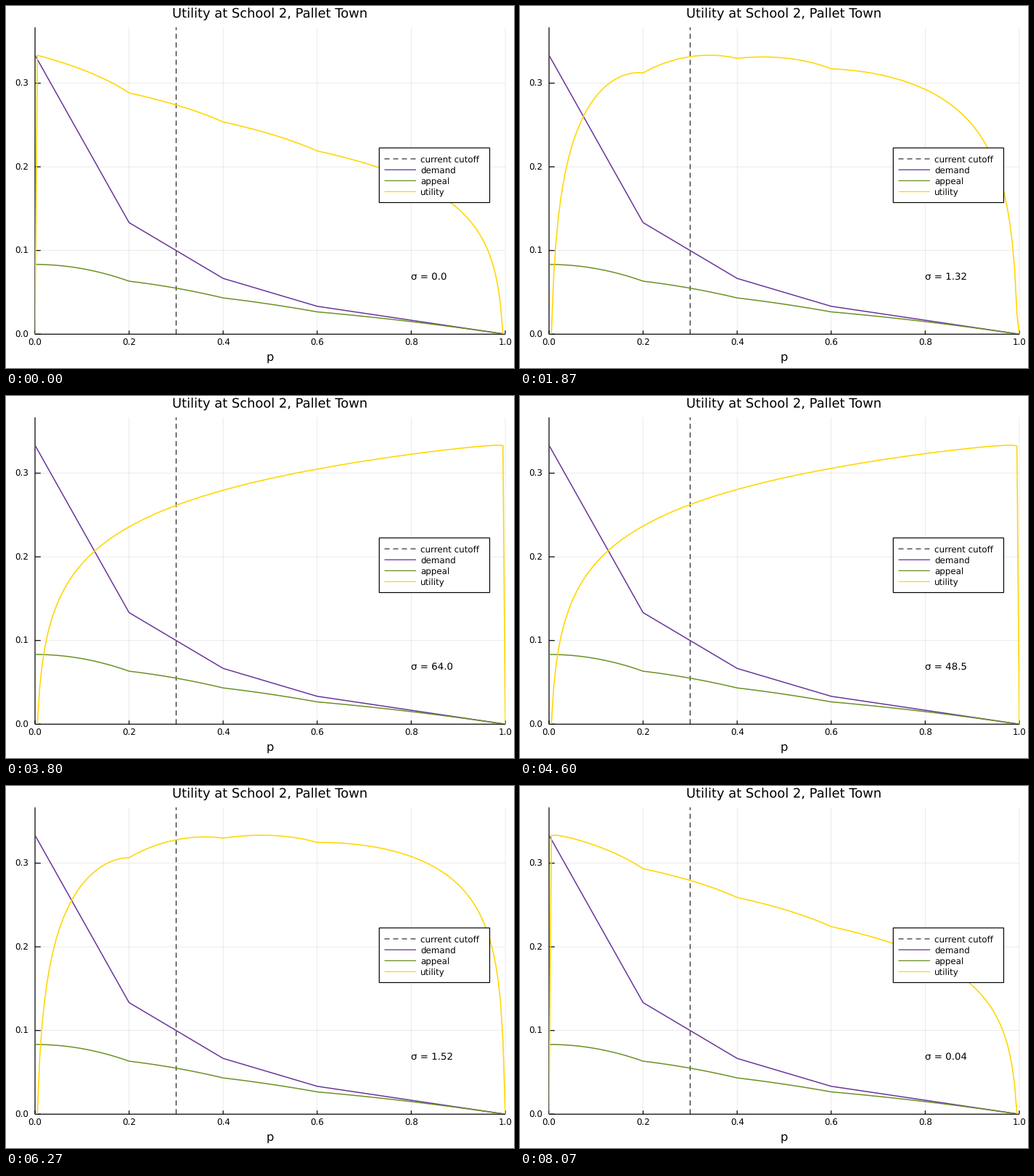
A matplotlib script for the animation above (8.14 s loop, 700x500 px).

```python
import numpy as np
import matplotlib.pyplot as plt
from matplotlib.animation import FuncAnimation
from matplotlib.lines import Line2D
from matplotlib.patches import Rectangle

W, H, DPI = 700, 500, 100
LEFT, RIGHT, TOP, BOTTOM = 40, 688, 29.5, 453.3
FRAMES, LOOP_MS = 122, 8140
PURPLE, OLIVE, GOLD = "#663399", "#6B8E23", "#FFD700"
PT = 72 / DPI          # points per pixel
FONT = 1.4875 * PT     # text scale

plt.rcParams.update({"font.family": "DejaVu Sans", "text.hinting": "none",
                     "path.simplify": False})

fig = plt.figure(figsize=(W / DPI, H / DPI), dpi=DPI, facecolor="white")
ax = fig.add_axes([LEFT / W, 1 - BOTTOM / H,
                   (RIGHT - LEFT) / W, (BOTTOM - TOP) / H])
YMAX = 1.1 / 3
ax.set(xlim=(0, 1), ylim=(0, YMAX))
ax.axis("off")


def text(x, y, s, size, ha="left"):
    """Text with its baseline at pixel (x, y), y downwards."""
    return fig.text(x / W, 1 - y / H, s, fontsize=size * FONT, ha=ha,
                    va="baseline", color="black")


def rule(xs, ys, width=1.2, **kw):
    """Straight line in axes data units."""
    kw = {"color": "black", "clip_on": False, "zorder": 1.5, **kw}
    ax.plot(xs, ys, lw=width * PT, solid_capstyle="butt", snap=False, **kw)


def dashes(width):
    return (0, (7 / width, 5 / width))


# Model: piecewise linear demand, appeal as its cutoff-weighted integral
KNOTS = np.array([0, 0.2, 0.4, 0.6, 1])
LEVELS = np.array([1 / 3, 2 / 15, 1 / 15, 1 / 30, 0])
p = np.linspace(0, 1, 201)
demand = np.interp(p, KNOTS, LEVELS)
mass = -np.diff(demand) * (p[1:] + p[:-1]) / 2
appeal = np.append(np.cumsum(mass[::-1])[::-1], 0)
LOG_D, LOG_P = np.log(demand[1:-1]), np.log(p[1:-1])


def sigma(k):
    k = min(k, FRAMES - k)
    return 2 ** ((k - 26) / 5) if k else 0.0


def utility(s):
    """Log utility rescaled to the height of demand; zero at both ends."""
    u = LOG_D + s * LOG_P
    u = (u - u.min()) / (u.max() - u.min()) * demand[0]
    return np.concatenate([[0], u, [0]])


# Grid, axes and ticks
for t in np.arange(6) / 5:
    rule([t, t], [0, YMAX], 0.8, alpha=0.1, zorder=1)
    rule([t, t], [0, 0.012 * YMAX])
    text(LEFT + (RIGHT - LEFT) * t, 469.2, f"{t:.1f}", 8, "center")
for t in np.arange(4) / 10:
    rule([0, 1], [t, t], 0.8, alpha=0.1, zorder=1)
    rule([0, 0.012], [t, t])
    text(31, BOTTOM - (BOTTOM - TOP) * t / YMAX + 4.3, f"{t:.1f}", 8, "right")
rule([0, 1], [0, 0])
rule([0, 0], [0, YMAX])

text(364, 15.8, "Utility at School 2, Pallet Town", 12, "center")
text(364, 490.9, "p", 11, "center")
label = text(558.4, 377.4, "", 9)

# Curves
rule([0.3, 0.3], [0, YMAX], 1.0, ls=dashes(1.0), zorder=2)
rule(p, demand, 1.5, color=PURPLE, clip_on=True, zorder=3)
rule(p, appeal, 1.5, color=OLIVE, clip_on=True, zorder=4)
curve, = ax.plot(p, utility(0), color=GOLD, lw=1.6 * PT, zorder=5)

# Legend
BOX_X, BOX_Y, BOX_W, BOX_H = 514.3, 196, 152.2, 75.5
fig.add_artist(Rectangle((BOX_X / W, 1 - (BOX_Y + BOX_H) / H), BOX_W / W,
                         BOX_H / H, fc="white", ec="black", lw=1.2 * PT,
                         snap=False, transform=fig.transFigure))
entries = [("current cutoff", "black", dashes(1.0), 1.0),
           ("demand", PURPLE, "-", 1.3),
           ("appeal", OLIVE, "-", 1.3),
           ("utility", GOLD, "-", 1.3)]
for i, (name, color, style, width) in enumerate(entries, 1):
    y = BOX_Y + BOX_H * i / 5
    fig.add_artist(Line2D([521.5 / W, 565 / W], [1 - y / H] * 2, color=color,
                          ls=style, lw=width * PT, solid_capstyle="butt",
                          snap=False, transform=fig.transFigure))
    text(571, y + 4.4, name, 8)


def draw(k):
    s = sigma(k)
    curve.set_ydata(utility(s))
    label.set_text(f"σ = {round(s, 2)}")
    return curve, label


anim = FuncAnimation(fig, draw, frames=FRAMES, interval=LOOP_MS / FRAMES,
                     repeat=True, repeat_delay=0)
plt.show()
```
